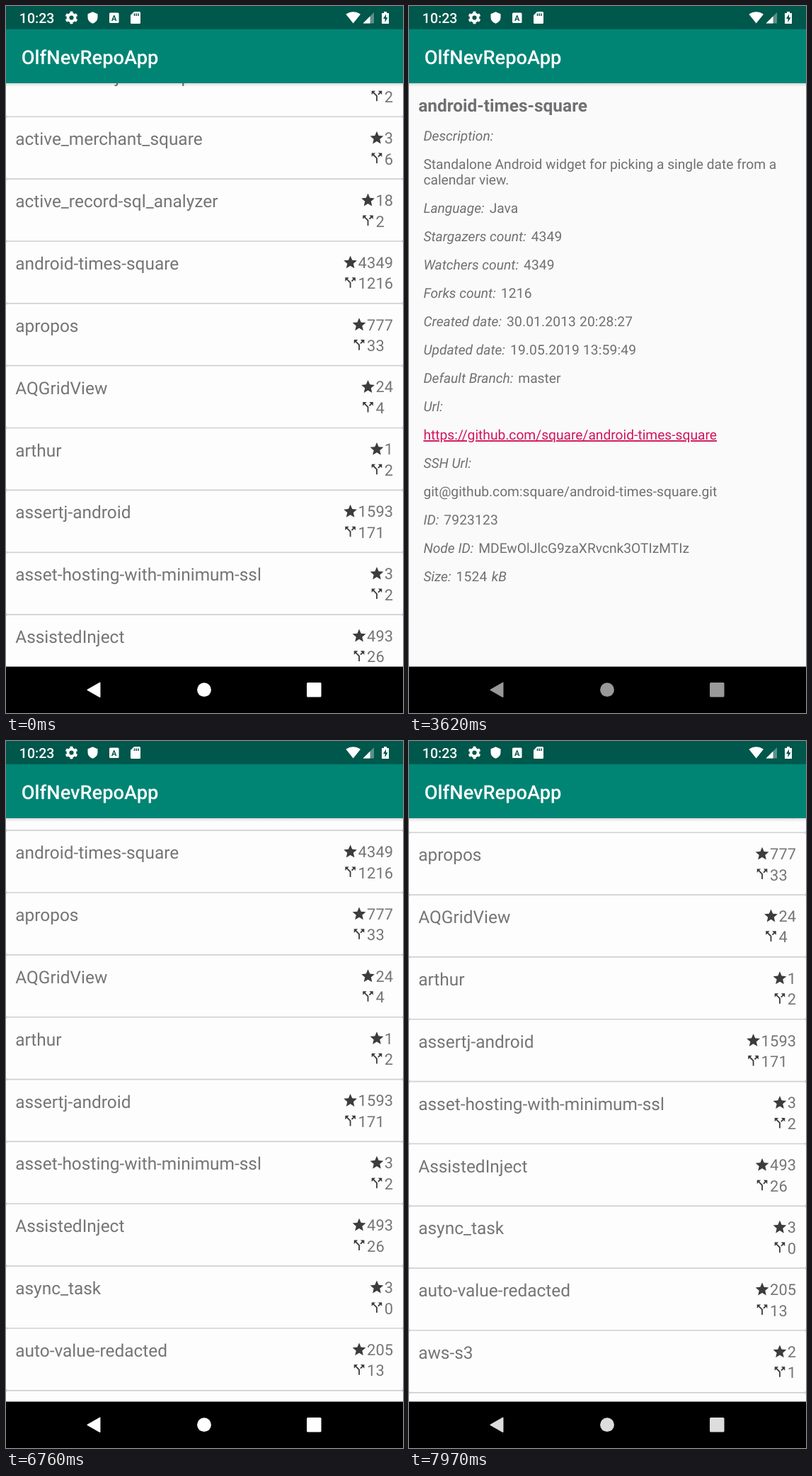
An HTML page that plays this animation: 561 by 998 pixels, repeating every 8 s.

```html
<!DOCTYPE html>
<html lang="en">
<head>
<meta charset="utf-8">
<title>Repository list</title>
<style>
  html, body { margin: 0; width: 100%; height: 100%; overflow: hidden; background: #000; }
  svg { display: block; font-family: Roboto, sans-serif; text-rendering: geometricPrecision; }
  .name { font-size: 24.45px; }
  .num { font-size: 21.8px; letter-spacing: .22px; }
  .text { font-size: 19.22px; }
  .label { font-style: italic; }
  .digits { letter-spacing: .15px; }
  .link {
    fill: #d1155b;
    text-decoration: underline 1.06px;
    text-decoration-skip-ink: none;
    text-underline-offset: 2.1px;
  }
</style>
</head>
<body>
<svg width="561" height="998" viewBox="0 0 561 998">
  <defs>
    <path id="star" fill="#3c3c3c" transform="translate(-.36 -.36) scale(.94)" d="M12 17.27L18.18 21l-1.64-7.03L22 9.24l-7.19-.61L12 2 9.19 8.63 2 9.24l5.46 4.73L5.82 21z"/>
    <path id="fork" fill="#3c3c3c" transform="scale(.91)" d="M14 4l2.29 2.29-2.88 2.88 1.42 1.42 2.88-2.88L20 10V4zm-4 0H4v6l2.29-2.29 4.71 4.7V20h2v-8.41l-5.29-5.3z"/>
    <linearGradient id="shade" x2="0" y2="1">
      <stop stop-color="#000" stop-opacity=".13"/>
      <stop offset="1" stop-color="#000" stop-opacity="0"/>
    </linearGradient>
  </defs>

  <g id="listPage">
    <rect y="109" width="561" height="824" fill="#d0d0d5"/>
    <g id="list" fill="#757575"></g>
  </g>
  <g id="detailPage">
    <rect y="109" width="561" height="824" fill="#fafafb"/>
    <g id="detail" fill="#707072"></g>
  </g>

  <rect y="109" width="561" height="5" fill="url(#shade)"/>
  <rect width="561" height="109" fill="#008575"/>
  <rect width="561" height="32.7" fill="#00574b"/>
  <text x="21.8" y="81.8" font-size="27.27" font-weight="500" fill="#fff">OlfNevRepoApp</text>

  <g fill="#fff">
    <text x="18.8" y="24" font-size="19.5" font-weight="500">10:23</text>
    <g fill="none" stroke="#fff">
      <circle cx="92.5" cy="16.5" r="5" stroke-width="3.8"/>
      <circle cx="92.5" cy="16.5" r="7.6" stroke-width="2.6" pathLength="12" stroke-dasharray="1" stroke-dashoffset="-.5"/>
    </g>
    <path d="M122.5 8.3l7 3v4.700q0 6.200-7 8.800q-7-2.600-7-8.800v-4.700z"/>
    <rect x="146" y="9.5" width="13.5" height="14.5" rx="1.5"/>
    <text x="152.7" y="21" font-size="11" font-weight="700" text-anchor="middle" fill="#00574b">A</text>
    <path d="M181 8h7.5q1.5 0 1.5 1.5v14q0 1.5-1.5 1.5h-11q-1.5 0-1.5-1.5v-10.5z"/>
    <path fill="none" stroke="#00574b" stroke-width="1.5" d="M181.5 10.5v3.5m2.7-3.5v3.5m2.7-3.5v3.5"/>
    <path transform="translate(480.1 5.7) scale(.88)" d="M12 21.5L23.6 7c-.4-.3-4.900-4-11.600-4S.8 6.700.4 7z"/>
    <path d="M520 9v15.5h-15.5z" opacity=".35"/>
    <path d="M514.5 14.5v10h-10z"/>
    <path d="M534 8h4v2h3v15h-10v-15h3z"/>
    <path fill="#00574b" d="M537 11.5l-4 6.5h2.5v5l4-6.800h-2.500z"/>
  </g>

  <rect y="932.55" width="561" height="65.45"/>
  <rect id="ripple" x="69.5" y="932.55" width="109" height="65.45" rx="32.7" fill="#fff"/>
  <g id="nav">
    <path d="M115.2 965.3l17.5-10v20z" stroke-width="1.5" stroke-linejoin="round"/>
    <circle cx="280" cy="965.2" r="9.9" stroke="none"/>
    <rect x="425" y="955" width="20.5" height="20.5" rx="1.5" stroke="none"/>
  </g>
</svg>

<script>
const $ = id => document.getElementById(id);
const PITCH = 87.85;
const STEP = 43.55; // the screen refreshes about 23 times a second

// name, stars, forks
const repos = [
  ['activerecord-jdbc-adapter', 3, 2],
  ['active_merchant_square', 3, 6],
  ['active_record-sql_analyzer', 18, 2],
  ['android-times-square', 4349, 1216],
  ['apropos', 777, 33],
  ['AQGridView', 24, 4],
  ['arthur', 1, 2],
  ['assertj-android', 1593, 171],
  ['asset-hosting-with-minimum-ssl', 3, 2],
  ['AssistedInject', 493, 26],
  ['async_task', 3, 0],
  ['auto-value-redacted', 205, 13],
  ['aws-s3', 2, 1],
  ['bank_holidays', 18, 4],
  ['binder', 2, 1]
];

$('list').innerHTML = repos.map(([name, stars, forks], i) => {
  const top = 156.3 + (i - 1) * PITCH;
  const digits = Math.max(`${stars}`.length, `${forks}`.length);
  const x = 547.3 - 12.46 * digits;
  return `<g transform="translate(0 ${top})">
    <rect y=".8" width="561" height="86.2" rx="2.7" fill="#fdfdfd"/>
    <text class="name" x="13.2" y="40">${name}</text>
    <use href="#star" x="${x - 21.8}" y="18.9"/>
    <text class="num" x="${x}" y="37.8">${stars}</text>
    <use href="#fork" x="${x - 21.8}" y="47.6"/>
    <text class="num" x="${x}" y="67.4">${forks}</text>
  </g>`;
}).join('');

const line = (y, body) => `<text class="text" x="20.4" y="${y}">${body}</text>`;
const label = s => `<tspan class="label">${s}</tspan>`;
const value = s => `<tspan dx="7"${/^[\d.: ]+$/.test(s) ? ' class="digits"' : ''}>${s}</tspan>`;
const pair = (key, val) => label(key + ':') + value(val);

$('detail').innerHTML =
  '<text class="name" font-weight="700" x="13.2" y="148.5">android-times-square</text>' +
  line(190, label('Description:')) +
  line(230, 'Standalone Android widget for picking a single date from a') +
  line(252, 'calendar view.') +
  [
    pair('Language', 'Java'),
    pair('Stargazers count', '4349'),
    pair('Watchers count', '4349'),
    pair('Forks count', '1216'),
    pair('Created date', '30.01.2013 20:28:27'),
    pair('Updated date', '19.05.2019 13:59:49'),
    pair('Default Branch', 'master'),
    label('Url:'),
    '<tspan class="link">https://github.com/square/android-times-square</tspan>',
    label('SSH Url:'),
    'git@github.com:square/android-times-square.git',
    pair('ID', '7923123'),
    pair('Node ID', 'MDEwOlJlcG9zaXRvcnk3OTIzMTIz'),
    pair('Size', '1524') + '<tspan class="label" dx="6.5">kB</tspan>'
  ].map((body, i) => line(292 + 40 * i, body)).join('');

// Smooth 0 to 1 between two times
const ease = (t, from, to) => {
  const u = Math.min(1, Math.max(0, (t - from) / (to - from)));
  return u * u * (3 - 2 * u);
};

function draw(t) {
  const inDetail = t >= 3610 && t < 5210;
  $('detailPage').style.display = inDetail ? '' : 'none';
  $('listPage').style.display = inDetail ? 'none' : '';

  // Drag up, hold, then drag part of the way back
  const scroll = -394.8 * ease(t, 6560, 6930) + 104.2 * ease(t, 7100, 7360);
  $('list').setAttribute('transform', `translate(0 ${scroll})`);

  // Buttons dim when idle and light up on touch
  const dim = ease(t, 60, 1620) - ease(t, 5120, 5370) + ease(t, 7365, 8925);
  const grey = Math.round(255 - 102 * dim);
  const color = `rgb(${grey},${grey},${grey})`;
  $('nav').setAttribute('fill', color);
  $('nav').setAttribute('stroke', color);
  $('ripple').setAttribute('opacity', t < 5120 ? 0 : .2 * (1 - ease(t, 5200, 5640)));
}

const start = performance.now();
function tick() {
  const t = (performance.now() - start) % 8000;
  draw(Math.floor(t / STEP) * STEP);
  requestAnimationFrame(tick);
}
tick();
</script>
</body>
</html>
```
